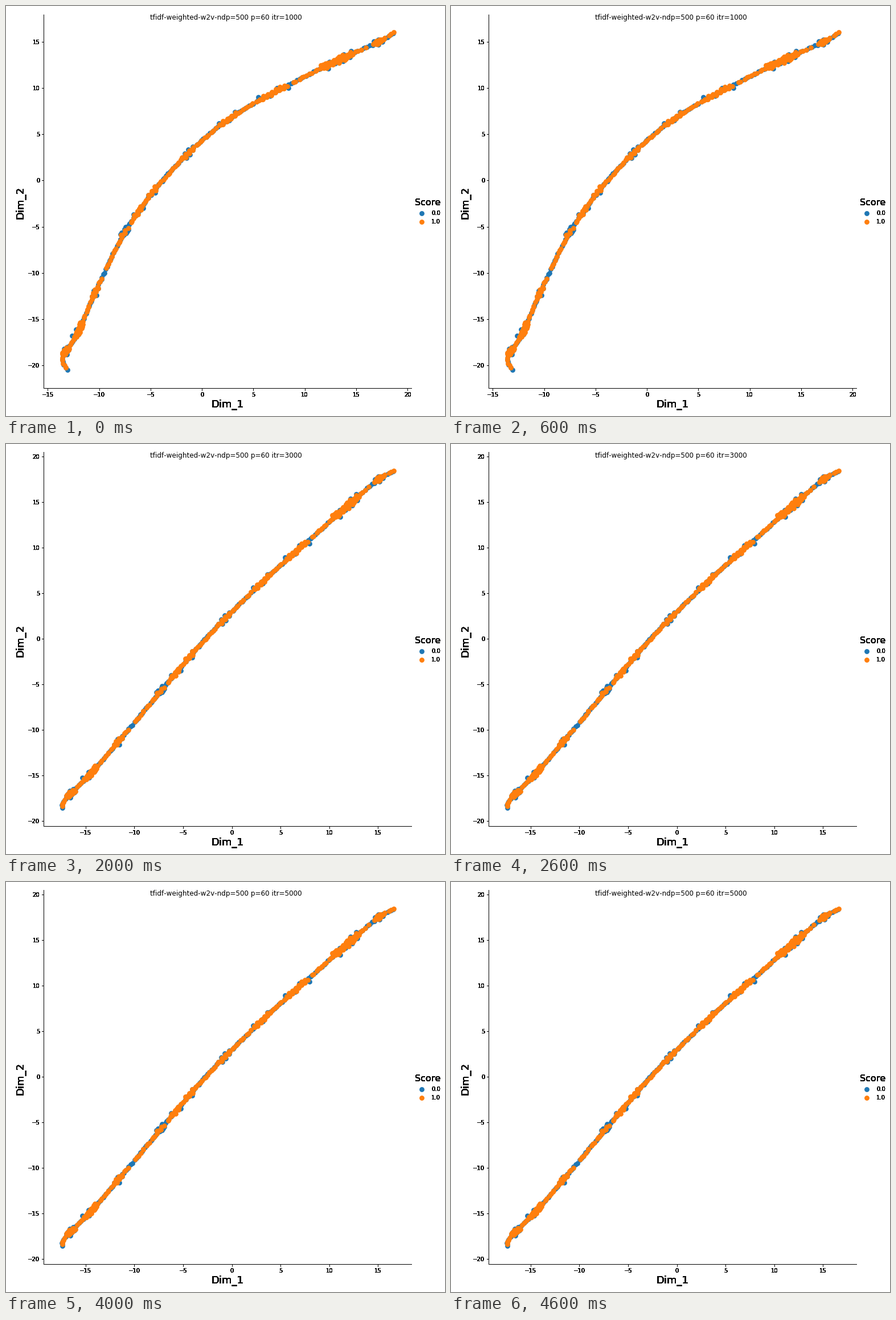
Animation, 771 px wide and 720 px high, one loop 5000 ms. Source, as a matplotlib script:

```python
import numpy as np
import matplotlib.pyplot as plt
from matplotlib.animation import FuncAnimation
from matplotlib.ticker import MultipleLocator

W, H = 771, 720
LEFT, RIGHT, TOP, BOTTOM = 66.2, 712.5, 14.5, 670.8
BLUE, ORANGE = "#1f77b4", "#ff7f0e"
DEPTH = 8   # stacked copies harden the antialiased text
UNIT = 16.5  # rough pixels per data unit

plt.rcParams.update({"font.family": "DejaVu Sans", "text.kerning_factor": 6})

# Axis limits (x, then y) while the embedding settles
LIMITS = [(-15.40, 20.41, -22.45, 17.99),
          (-18.99, 18.70, -20.55, 20.06),
          (-19.30, 18.45, -20.58, 20.44)]
UNSETTLED = [1, 0.11, 0]  # share of the starting shape left in each view

# Key points of the curve: starting x, y and settled x, y
KEYS = np.array([(-13.07, -20.49, -17.38, -18.59),
                 (-13.57, -19.13, -17.14, -17.66),
                 (-12.08, -16.42, -14.63, -14.97),
                 (-10.30, -11.86, -11.48, -11.09),
                 (-7.31, -5.21, -7.04, -5.41),
                 (-3.16, 0.89, -2.66, 0.03),
                 (2.55, 6.62, 3.07, 6.16),
                 (9.75, 11.12, 8.91, 11.78),
                 (14.18, 13.52, 12.59, 15.28),
                 (17.17, 15.00, 15.10, 17.53),
                 (18.67, 15.99, 16.62, 18.40)])
LAST = len(KEYS) - 1

# Clumps: place along the curve, orange count, blue count
CLUMPS = [(1.3, 12, 7), (2.05, 17, 5), (2.95, 6, 4), (3.95, 4, 9),
          (4.3, 5, 2), (4.65, 5, 3), (5.35, 7, 7), (6.0, 9, 3),
          (6.6, 14, 4), (7.75, 32, 9), (9.0, 11, 4)]
GAPS = [0, 3.3, 4.03, 6.8, 8.1, 8.6]  # short stretches without orange


def curve(t, view):
    """Catmull-Rom spline through the key points of one view."""
    k = UNSETTLED[view]
    pts = k * KEYS[:, :2] + (1 - k) * KEYS[:, 2:]
    pts = np.vstack([pts[:1], pts, pts[-1:]])
    i = np.minimum(t.astype(int), LAST - 1)
    u = (t - i)[:, None]
    a, b, c, d = (pts[i + j] for j in range(4))
    return b + 0.5 * u * (c - a + u * (2 * a - 5 * b + 4 * c - d
                                       + u * (3 * (b - c) + d - a)))


def place(dots, view):
    """Points at t along the curve, shifted sideways by some pixels."""
    t, off = dots
    ahead = curve(np.minimum(t + 0.1, LAST), view)
    d = ahead - curve(np.maximum(t - 0.1, 0), view)
    d /= np.hypot(*d.T)[:, None]
    normal = np.column_stack([-d[:, 1], d[:, 0]])
    return curve(t, view) + (off / UNIT)[:, None] * normal


def ribbon(rng, count):
    """Dots spaced almost evenly by length along the curve."""
    t = np.linspace(0, LAST, 1500)
    step = np.hypot(*np.diff(curve(t, 0), axis=0).T)
    s = np.r_[0, np.cumsum(step)]
    at = np.linspace(0, s[-1], count) + rng.normal(0, 0.08, count)
    return np.array([np.interp(at, s, t), rng.normal(0, 0.4, count)])


def clump(rng, t, size, count, extra=0):
    along = 0.011 * size + 0.02
    half = 2.5 + size / 12 + extra
    side = np.where(np.arange(count) % 2, -1, 1)
    return np.array([t + np.linspace(-along, along, count),
                     side * half * rng.uniform(0.3, 1, count)])


def make_dots():
    rng = np.random.default_rng(7)
    orange, blue = ribbon(rng, 170), ribbon(rng, 190)
    near = np.abs(orange[0][:, None] - np.array(GAPS)).min(axis=1)
    orange = [orange[:, near > 0.06]]
    blue = [blue]
    for t, n, m in CLUMPS:
        orange.append(clump(rng, t, n, n))
        blue.append(clump(rng, t, n, m, extra=1.5))
    return np.hstack(blue), np.hstack(orange)


fig = plt.figure(figsize=(W / 72, H / 72), dpi=72, facecolor="white")
box = [LEFT / W, 1 - BOTTOM / H, (RIGHT - LEFT) / W, (BOTTOM - TOP) / H]

stack = []
for i in range(DEPTH):
    ax = fig.add_axes(box, label=f"axes{i}")
    ax.patch.set_visible(False)
    ax.spines[["top", "right"]].set_visible(False)
    ax.xaxis.set_major_locator(MultipleLocator(5))
    ax.yaxis.set_major_locator(MultipleLocator(5))
    stack.append(ax)

canvas = fig.add_axes([0, 0, 1, 1], label="canvas")
canvas.set(xlim=(0, W), ylim=(H, 0))
canvas.axis("off")


def scatter(ax, x, y, color):
    return ax.scatter(x, y, s=78, c=color, linewidths=0, antialiased=False)


def label(x, y, text, size, **kw):
    for _ in range(DEPTH):
        canvas.text(x, y, text, fontsize=size, **kw)


layers = [(dots, scatter(stack[-1], *dots, color))
          for dots, color in zip(make_dots(), (BLUE, ORANGE))]

label(389, 705, "Dim_1", 18, ha="center")
label(29.5, 345, "Dim_2", 18, ha="center", va="baseline", rotation=90,
      rotation_mode="anchor")
label(718, 350, "Score", 16)
for y, name, color in ((363.5, "0.0", BLUE), (378.5, "1.0", ORANGE)):
    scatter(canvas, [729.5], [y], color)
    label(747, y + 3.2, name, 10)

title = fig.suptitle("", fontsize=12, x=0.501, y=0.98)


def update(i):
    view = min(i, 2)
    x0, x1, y0, y1 = LIMITS[view]
    for ax in stack:
        ax.set(xlim=(x0, x1), ylim=(y0, y1))
    for dots, points in layers:
        points.set_offsets(place(dots, view))
    title.set_text(f"tfidf-weighted-w2v-ndp=500 p=60 itr={1000 * (i + 1)}")
    return []


anim = FuncAnimation(fig, update, frames=5, interval=1000, repeat=True,
                     repeat_delay=0, blit=False)
plt.show()
```
